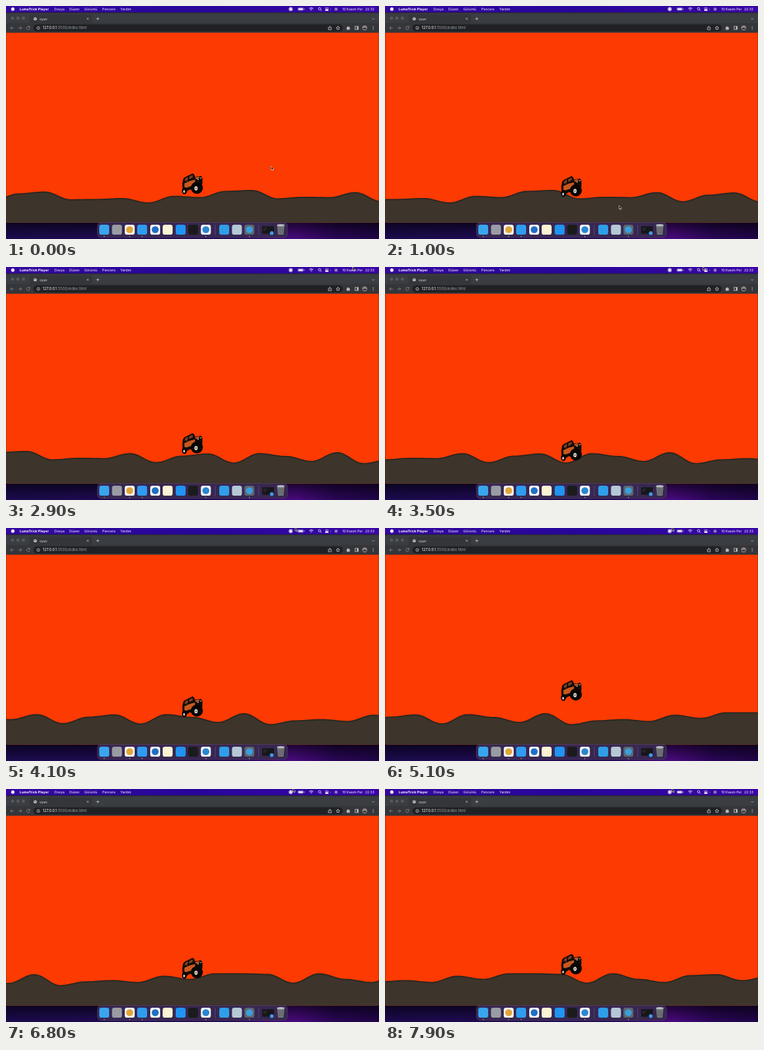
These frames come from a looping animation (600x375 px, 8000 ms). An HTML page:

```html
<!DOCTYPE html>
<html lang="tr">
<head>
<meta charset="utf-8">
<title>oyun</title>
<style>
  html, body { margin: 0; width: 100%; height: 100%; overflow: hidden; background: #140a28; }
  svg { display: block; width: 100vw; height: 100vh; }
  text { font: 5.4px Inter, "Open Sans", sans-serif; fill: #fff; }
  .app { font-weight: 700; letter-spacing: .1px; }
  .tab { fill: #dfe1e4; }
  .url { font-size: 6px; }
  .line { fill: none; stroke: #c8cacd; stroke-width: .8; }
  .dim { stroke: #8d9094; }
</style>
</head>
<body>
<svg viewBox="0 0 600 375">
  <defs>
    <linearGradient id="bar">
      <stop offset="0" stop-color="#3508a0"/><stop offset=".5" stop-color="#27069a"/><stop offset="1" stop-color="#3a06a6"/>
    </linearGradient>
    <linearGradient id="wall">
      <stop offset="0" stop-color="#1c0b50"/><stop offset=".6" stop-color="#230a54"/>
      <stop offset=".77" stop-color="#4a0a80"/><stop offset=".88" stop-color="#2a0658"/><stop offset="1" stop-color="#200548"/>
    </linearGradient>
    <linearGradient id="shade" x2="0" y2="1">
      <stop offset="0" stop-opacity=".65"/><stop offset="1" stop-opacity="0"/>
    </linearGradient>
    <clipPath id="page"><path d="M0 42.9H600V345.700q0 3-3 3H3q-3 0-3-3z"/></clipPath>
  </defs>

  <rect y="340" width="600" height="35" fill="url(#wall)"/>
  <rect y="346" width="600" height="29" fill="url(#shade)"/>

  <!-- menu bar -->
  <rect width="600" height="10.5" fill="url(#bar)"/>
  <circle cx="11" cy="5" r="2.7" fill="#fff"/>
  <text class="app" x="22" y="7">LumaTrick Player</text>
  <text x="78" y="7">Dosya</text>
  <text x="102" y="7">Düzen</text>
  <text x="126" y="7">Görüntü</text>
  <text x="155" y="7">Pencere</text>
  <text x="184" y="7">Yardım</text>
  <g fill="none" stroke="#fff" stroke-width=".8">
    <circle cx="458" cy="5" r="2.9"/><circle cx="458" cy="5" r="1.6" fill="#fff"/>
    <rect x="469.7" y="3" width="8.6" height="4" rx="1.1" stroke-opacity=".6"/>
    <path d="M470.5 5h7" stroke-width="2.6"/><path d="M480 4.3v1.5"/>
    <path d="M487.6 4q3.4-3 6.8 0M488.9 5.4q2.1-1.8 4.2 0M490.3 6.8h1.4"/>
    <circle cx="504.4" cy="4.4" r="1.9"/><path d="M505.8 5.8l1.8 1.8"/>
    <g stroke-width=".6">
      <rect x="513.6" y="2.8" width="5" height="1.8" rx=".9"/>
      <rect x="513.6" y="5.7" width="5" height="1.8" rx=".9" fill="#fff"/>
      <path d="M522 4.500v1.500"/>
    </g>
  </g>
  <circle cx="531" cy="5" r="2.6" fill="#8a78b8"/>
  <text x="541" y="7">10 Kasım Per</text>
  <text id="clock" x="592.5" y="7" text-anchor="end">22:32</text>

  <!-- browser frame -->
  <rect y="10.5" width="600" height="34" fill="#3a3d41"/>
  <path d="M0 10.8H600" stroke="#1d1a30" stroke-width=".7"/>
  <path d="M0 27.5H36q2 0 2-2V16q0-2.5 2.5-2.5H136q2.5 0 2.5 2.5v9.5q0 2 2 2H600V44H0z" fill="#35363a"/>
  <g fill="#56595d"><circle cx="10.5" cy="19.5" r="2.5"/><circle cx="19.2" cy="19.5" r="2.5"/><circle cx="28" cy="19.5" r="2.5"/></g>
  <circle cx="47" cy="20.5" r="2.6" fill="#c4c7ca"/>
  <path d="M45 19.5l2 .5.5 1.8M47.5 18.5l1.5 1.2" fill="none" stroke="#4b4e52" stroke-width=".8"/>
  <text class="tab" x="54" y="22.5">oyun</text>
  <path d="M130 19l3 3m0-3l-3 3M145.2 20.5h5m-2.5-2.5v5M589 19.8l1.8 1.8 1.8-1.8" class="line"/>
  <rect x="44" y="29.5" width="498" height="11.5" rx="5.7" fill="#202124"/>
  <path d="M12.500 35.3H7.300m2.500-2.500l-2.500 2.500 2.500 2.500M20 35.3h5.200m-2.500-2.500l2.500 2.500-2.500 2.500" class="line dim"/>
  <path d="M38 33.8a2.600 2.600 0 1 0 .4 2.200M38.500 32.300v2h-2" class="line dim"/>
  <circle cx="52" cy="35.3" r="2.300" class="line"/><path d="M52 35v1.500M52 33.700v.5" class="line"/>
  <text class="url" x="59" y="37.4">127.0.0.1<tspan fill="#9aa0a6">:5500/index.html</tspan></text>
  <path d="M519.5 34.5h-1v3.700h4.800v-3.700h-1M520.9 36.500v-4m-1.400 1.300l1.400-1.400 1.400 1.400" class="line"/>
  <path d="M534 32.300l.9 2 2.100.2-1.600 1.400.5 2.100-1.900-1.100-1.900 1.100.5-2.100-1.600-1.400 2.100-.2z" class="line"/>
  <path d="M548 33.800h1.500a1 1 0 0 1 2 0h1.300v1.500a1 1 0 0 1 0 1.800v1.200H548z" fill="#b4b7ba"/>
  <rect x="561.5" y="32.800" width="5.200" height="5" class="line"/><path d="M565.5 33v4.700" class="line" style="stroke-width:1.800"/>
  <circle cx="577" cy="35.3" r="4" fill="#8d8583"/><path d="M573.8 37.500a3.300 3.300 0 0 1 6.400 0z" fill="#2c2a2c"/>
  <g fill="#c8cacd"><circle cx="590.7" cy="33.2" r=".7"/><circle cx="590.7" cy="35.4" r=".7"/><circle cx="590.7" cy="37.6" r=".7"/></g>

  <!-- game -->
  <g clip-path="url(#page)">
    <rect y="42" width="600" height="307" fill="#fc3a02"/>
    <path id="ground" fill="#3d342b" stroke="#2a2721" stroke-width="2"/>
    <g id="truck">
      <path d="M-16.500 0l1.500-8 2-2.500L0-17l2.500 1.500L4-11.500 14-13l2 4v9L6 9H-5l-4 3-7-4z" fill="#120b08"/>
      <path d="M-13-1l9-4 8-2v5L0 3l-4 1-6 2-3-1z" fill="#c9571f"/>
      <path d="M4-10.500l6-1.200 2 1.500L6-7.500z" fill="#c9571f"/>
      <path d="M-13-4.500l1.500-4.500 4-2-1 4.500zM-6-7.500l1-4.500 5-2.500.500 4z" fill="#7a4024"/>
      <path d="M-8-11l-1.200 7.500" stroke="#c9571f" stroke-width=".7"/>
      <circle cx="9" cy="-7.500" r="1" fill="#e8d7bf"/><circle cx="13.500" cy="-9.500" r=".9" fill="#e8d7bf"/>
      <circle cx="7" cy="6" r="9.700" fill="#080706"/>
      <ellipse cx="5.700" cy="7" rx="2.600" ry="3.400" fill="#ddd6d1"/><circle cx="5.700" cy="7" r="1.100" fill="#5a4b44"/>
      <ellipse cx="-13" cy="11" rx="4" ry="5.500" fill="#080706"/>
      <ellipse cx="-13.500" cy="12" rx="1.400" ry="2.200" fill="#ddd6d1"/>
    </g>
    <path d="M.3 43V349M599.700 43V349" stroke="#4a2a22" stroke-opacity=".7" stroke-width=".6"/>
  </g>

  <!-- dock -->
  <rect x="147" y="348.5" width="306" height="24" rx="6" fill="#372751" stroke="#5a4676" stroke-width=".5"/>
  <g id="dock"></g>
  <path d="M336.5 352v17M406.5 352v17" stroke="#6a5886" stroke-width=".6"/>
  <rect x="412" y="354.5" width="19" height="12" rx="1" fill="#17171a"/>
  <path d="M414 358h6m-6 2.500h4" stroke="#4b4b50" stroke-width=".7"/>
  <circle cx="427.5" cy="365.5" r="3" fill="#3f9bea"/>
  <path d="M436 352.500h12l-1.700 15.500h-8.600z" fill="#74777b"/><ellipse cx="442" cy="352.700" rx="6.200" ry="1.800" fill="#b9bcbf"/>
  <path d="M439 356l.7 10M442 356v10M445 356l-.7 10" stroke="#505357" stroke-width=".7"/>

  <path id="cursor" d="M0 0v5.800l1.300-1.200 1 2.300 1-.4-1-2.200H4.200z" fill="#000" stroke="#fff" stroke-width=".6"/>
</svg>

<script>
const LOOP = 8000, SPEED = 0.125, KNOT = 125 / 3, FIRST = 20.5 - KNOT, RIDE = 17;
const el = id => document.getElementById(id);

// Terrain heights, one per knot, joined by cosine easing
const heights = [313, 302, 299, 311.5, 311, 309.5, 316.5, 306, 308, 298, 296.5, 310, 307.5,
  308, 300, 314.5, 304, 300.5, 315, 300, 304.5, 312.5, 298.5, 316, 310, 308, 311, 301, 306,
  297, 297, 298, 312, 297, 306, 311, 300, 298.5, 308, 302];

// Where the truck leaves the ground, and how steeply
const jumps = [[250, .4], [333, .38], [541, .3], [624.6, .4], [688, 0],
  [874.8, .73], [1083, .33], [1166, .34], [1272, 0]];

// Pointer: time, x, y
const pointer = [[0, 426.5, 258], [1000, 376.5, 321], [1500, 376.5, 321], [2500, 557.5, 0],
  [2900, 557.5, 0], [4100, 465, -1], [4600, 461.5, -1], [LOOP, 461.5, -1]];

function terrain(x) {
  const u = (x - FIRST) / KNOT, i = Math.floor(u);
  const a = heights[i], b = heights[i + 1];
  return a + (b - a) * (1 - Math.cos((u - i) * Math.PI)) / 2 + 0.4;
}

function truckY(x) {
  const floor = terrain(x) - RIDE;
  const jump = jumps.filter(j => j[0] <= x).pop();
  if (!jump) return floor;
  const d = x - jump[0];
  return Math.min(floor, terrain(jump[0]) - RIDE - jump[1] * d + 0.0048 * d * d);
}

function pointerAt(t) {
  const i = pointer.findIndex(p => p[0] > t);
  const [t0, x0, y0] = pointer[i - 1], [t1, x1, y1] = pointer[i];
  const k = (t - t0) / (t1 - t0);
  return [x0 + (x1 - x0) * k, y0 + (y1 - y0) * k];
}

// Dock icons: centre, tile colour, optional disc colour, running
const icons = [[158, '#39a5ee', '', 1], [178.5, '#9a9ca4'], [199, '#f4f4f4', '#e0a63a', 1],
  [219, '#2f9cf0', '', 1], [240, '#f2f5f8', '#1f6fc4'], [260, '#fbf3d4'], [281, '#2193f0'],
  [301, '#1b1b1d'], [321.5, '#f4f6f8', '#2a87cf', 1], [351, '#2f9ee8'], [371.5, '#b5c8d6'],
  [391.5, '#5f666e', '#3b9fdc', 1]];
el('dock').innerHTML = icons.map(([x, tile, disc, running]) =>
  `<rect x="${x - 8}" y="352" width="16" height="16" rx="3.6" fill="${tile}"/>` +
  (disc ? `<circle cx="${x}" cy="360" r="5.6" fill="${disc}"/>` : '') +
  (running ? `<circle cx="${x}" cy="371" r=".7" fill="#ddd"/>` : '')).join('');

function draw(now) {
  const t = Math.floor(now % LOOP / 100) * 100, shift = t * SPEED;
  let path = 'M-3 352';
  for (let x = -3; x <= 603; x += 3) path += `L${x} ${terrain(x + shift).toFixed(2)}`;
  el('ground').setAttribute('d', path + 'V352z');
  el('truck').setAttribute('transform', `translate(300 ${truckY(300 + shift).toFixed(2)})`);
  el('cursor').setAttribute('transform', `translate(${pointerAt(t)})`);
  el('clock').textContent = t < 1900 ? '22:32' : '22:33';
  requestAnimationFrame(draw);
}
draw(0);
</script>
</body>
</html>
```
